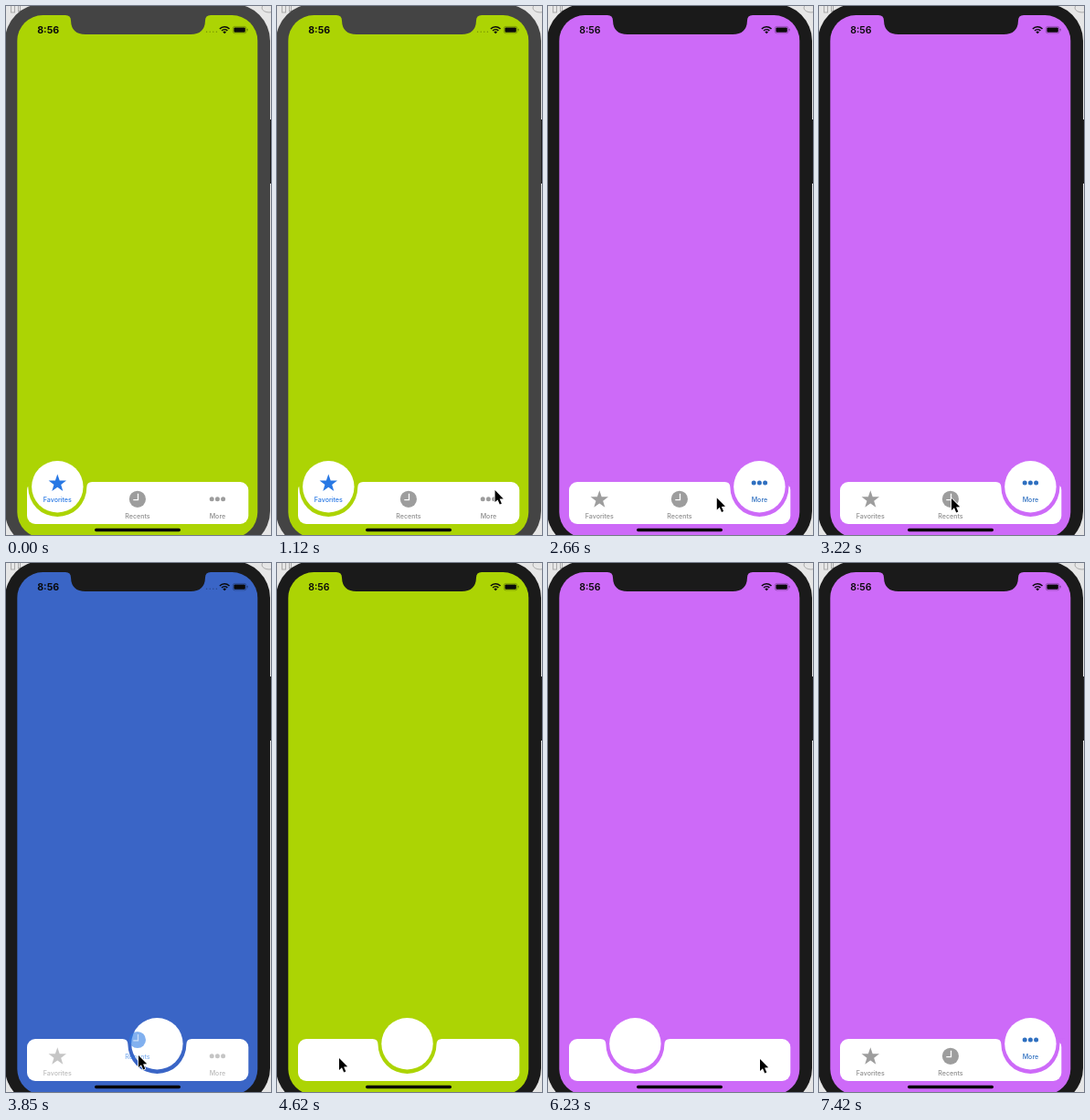
Animation, 290 px wide and 578 px high, one loop 7490 ms. Source, as an HTML page with a canvas:

```html
<!DOCTYPE html>
<html lang="en">
<head>
<meta charset="utf-8">
<title>Circle tab bar</title>
<style>
html, body { margin: 0; width: 100%; height: 100%; overflow: hidden; background: #e6e6e6; }
canvas { display: block; width: 290px; height: 578px; }
</style>
</head>
<body>
<canvas id="stage"></canvas>
<script>
const W = 290, H = 578, LOOP = 7490, MOVE = 350, FOCUS = 1450;
const FONT = 'Inter, Roboto, "Liberation Sans", sans-serif';
const canvas = document.getElementById('stage');
const ctx = canvas.getContext('2d');
const dpr = window.devicePixelRatio || 1;
canvas.width = W * dpr;
canvas.height = H * dpr;

const TABS = [
  { name: 'Favorites', x: 56.3, bg: '#acd404', tint: '#2878e4', icon: star },
  { name: 'Recents', x: 143.9, bg: '#3a65c6', tint: '#2878e4', icon: clock },
  { name: 'More', x: 231.4, bg: '#cd6af8', tint: '#2f70c0', icon: dots }
];

// When each tab is tapped
const TAPS = [
  { t: -1000, tab: 0 }, { t: 1516, tab: 2 }, { t: 3614, tab: 1 },
  { t: 4595, tab: 0 }, { t: 6124, tab: 2 }
];

// Pointer stops: time, x, y
const POINTER = [
  [700, 292, 500], [1300, 224, 537], [2454, 224, 537], [2870, 145, 538],
  [3930, 145, 538], [4450, 68, 541], [5200, 68, 541], [5950, 232, 542],
  [7000, 232, 542], [7300, 237, 581]
];

const clamp = v => Math.max(0, Math.min(1, v));
const ease = v => v * v * (3 - 2 * v);
const mix = (a, b, p) => a + (b - a) * p;

function box(x, y, w, h, r, color) {
  ctx.fillStyle = color;
  ctx.beginPath();
  ctx.roundRect(x, y, w, h, r);
  ctx.fill();
}

function disc(x, y, r, color) {
  ctx.fillStyle = color;
  ctx.beginPath();
  ctx.arc(x, y, r, 0, Math.PI * 2);
  ctx.fill();
}

function text(str, x, y, size, weight, color, align) {
  ctx.font = `${weight} ${size}px ${FONT}`;
  ctx.textAlign = align;
  ctx.fillStyle = color;
  ctx.fillText(str, x, y);
}

function star(x, y, color) {
  ctx.fillStyle = color;
  ctx.beginPath();
  for (let i = 0; i < 10; i++) {
    const r = i % 2 ? 4.1 : 10.2;
    const a = i * Math.PI / 5 - Math.PI / 2;
    ctx.lineTo(x + r * Math.cos(a), y + 0.7 + r * Math.sin(a));
  }
  ctx.fill();
}

function clock(x, y, color) {
  disc(x, y, 9.1, color);
  ctx.strokeStyle = '#fff';
  ctx.lineWidth = 1.3;
  ctx.beginPath();
  ctx.moveTo(x + 0.6, y - 6);
  ctx.lineTo(x + 0.6, y + 0.8);
  ctx.lineTo(x - 4.6, y + 0.8);
  ctx.stroke();
}

function dots(x, y, color) {
  for (let i = -1; i <= 1; i++) disc(x + i * 6.2, y, 2.5, color);
}

function desktop() {
  ctx.fillStyle = '#e6e6e6';
  ctx.fillRect(0, 0, W, H);
  ctx.strokeStyle = '#aaa';
  ctx.lineWidth = 1;
  ctx.strokeRect(5.5, -2, 4, 9);
  ctx.strokeRect(13.5, -2, 2, 8);
  ctx.beginPath();
  ctx.ellipse(288, 2, 8, 5, 0, 0, Math.PI * 2);
  ctx.stroke();
  ctx.fillStyle = '#1c1c1c';
  ctx.fillRect(288, 124, 2, 70);
}

function phone(bezel, bg) {
  box(-1, -2, 290, 594, 40, bezel);
  box(12.3, 10, 263, 571, 28, bg);
  ctx.fillStyle = bezel;
  ctx.beginPath();
  ctx.moveTo(65, 9.5);
  ctx.lineTo(65, 10);
  ctx.quadraticCurveTo(71, 10, 71, 16);
  ctx.quadraticCurveTo(71.5, 31, 87, 31);
  ctx.lineTo(202, 31);
  ctx.quadraticCurveTo(217.5, 31, 218, 16);
  ctx.quadraticCurveTo(218, 10, 224, 10);
  ctx.lineTo(224, 9.5);
  ctx.fill();
}

function statusBar(strong) {
  const ink = '#0a0a0a';
  text('8:56', 34.2, 30, 10.6, strong ? 700 : 600, ink, 'left');
  if (strong) {
    for (let i = 0; i < 4; i++) disc(219.6 + i * 3.6, 28.3, 0.7, 'rgba(0,0,0,.3)');
  }
  ctx.strokeStyle = ink;
  ctx.lineWidth = 1.5;
  for (const r of [8, 5]) {
    ctx.beginPath();
    ctx.arc(239.2, 30, r - 0.7, -Math.PI * 0.76, -Math.PI * 0.24);
    ctx.stroke();
  }
  ctx.fillStyle = ink;
  ctx.beginPath();
  ctx.moveTo(239.2, 30.3);
  ctx.arc(239.2, 30, 2.4, -Math.PI * 0.78, -Math.PI * 0.22);
  ctx.fill();
  ctx.strokeStyle = 'rgba(0,0,0,.35)';
  ctx.lineWidth = 0.7;
  ctx.beginPath();
  ctx.roundRect(248.3, 22.4, 14.6, 7.4, 2);
  ctx.stroke();
  box(249.4, 23.4, 12.4, 5.4, 1.2, ink);
  box(263.6, 24.8, 0.9, 2.6, 0.4, 'rgba(0,0,0,.4)');
}

function tabBar(cx, active, alpha, bg) {
  box(23, 520, 242.3, 46, 9, '#fff');
  // Dip around the moving circle
  ctx.fillStyle = bg;
  ctx.beginPath();
  ctx.moveTo(cx - 38, 519.3);
  ctx.lineTo(cx - 38, 520);
  ctx.quadraticCurveTo(cx - 32, 520, cx - 32, 526);
  ctx.arc(cx, 526, 32, Math.PI, 0, true);
  ctx.quadraticCurveTo(cx + 32, 520, cx + 38, 520);
  ctx.lineTo(cx + 38, 519.3);
  ctx.fill();
  disc(cx, 525.3, 28.2, '#fff');

  ctx.globalAlpha = alpha;
  TABS.forEach((tab, i) => {
    const on = i === active;
    const lift = on ? 17.8 : 0;
    tab.icon(tab.x, 538.8 - lift, on ? tab.tint : '#9d9d9d');
    text(tab.name, tab.x, 560.2 - lift, 7.1, 500, on ? tab.tint : '#8c8c8c', 'center');
  });
  ctx.globalAlpha = 1;
  box(97, 570.8, 94, 3.4, 1.7, '#050505');
}

function pointer(t) {
  const last = POINTER.length - 1;
  if (t < POINTER[0][0] || t > POINTER[last][0]) return;
  let i = 0;
  while (i < last - 1 && t > POINTER[i + 1][0]) i++;
  const [t0, x0, y0] = POINTER[i], [t1, x1, y1] = POINTER[i + 1];
  const p = ease((t - t0) / (t1 - t0));
  ctx.save();
  ctx.translate(mix(x0, x1, p), mix(y0, y1, p));
  ctx.beginPath();
  ctx.moveTo(0, 0);
  ctx.lineTo(0, 13);
  ctx.lineTo(3, 10.3);
  ctx.lineTo(5.2, 15.5);
  ctx.lineTo(7.3, 14.6);
  ctx.lineTo(5.1, 9.5);
  ctx.lineTo(9.2, 9.3);
  ctx.closePath();
  ctx.lineWidth = 1.6;
  ctx.lineJoin = 'round';
  ctx.strokeStyle = '#fff';
  ctx.stroke();
  ctx.fillStyle = '#000';
  ctx.fill();
  ctx.restore();
}

function draw(t) {
  let n = 0;
  while (n < TAPS.length - 1 && t >= TAPS[n + 1].t) n++;
  const { t: start, tab } = TAPS[n];
  const from = TABS[TAPS[Math.max(0, n - 1)].tab];
  const to = TABS[tab];
  const k = clamp((t - start) / MOVE);
  const cx = mix(from.x, to.x, ease(k));

  ctx.setTransform(dpr, 0, 0, dpr, 0, 0);
  desktop();
  phone(t < FOCUS ? '#444' : '#1a1a1a', to.bg);
  statusBar(tab !== 2 && k > 0.5);
  tabBar(cx, tab, clamp((k - 0.4) / 0.47), to.bg);
  pointer(t);
}

const began = performance.now();
function tick() {
  draw((performance.now() - began) % LOOP);
  requestAnimationFrame(tick);
}
tick();
</script>
</body>
</html>
```
